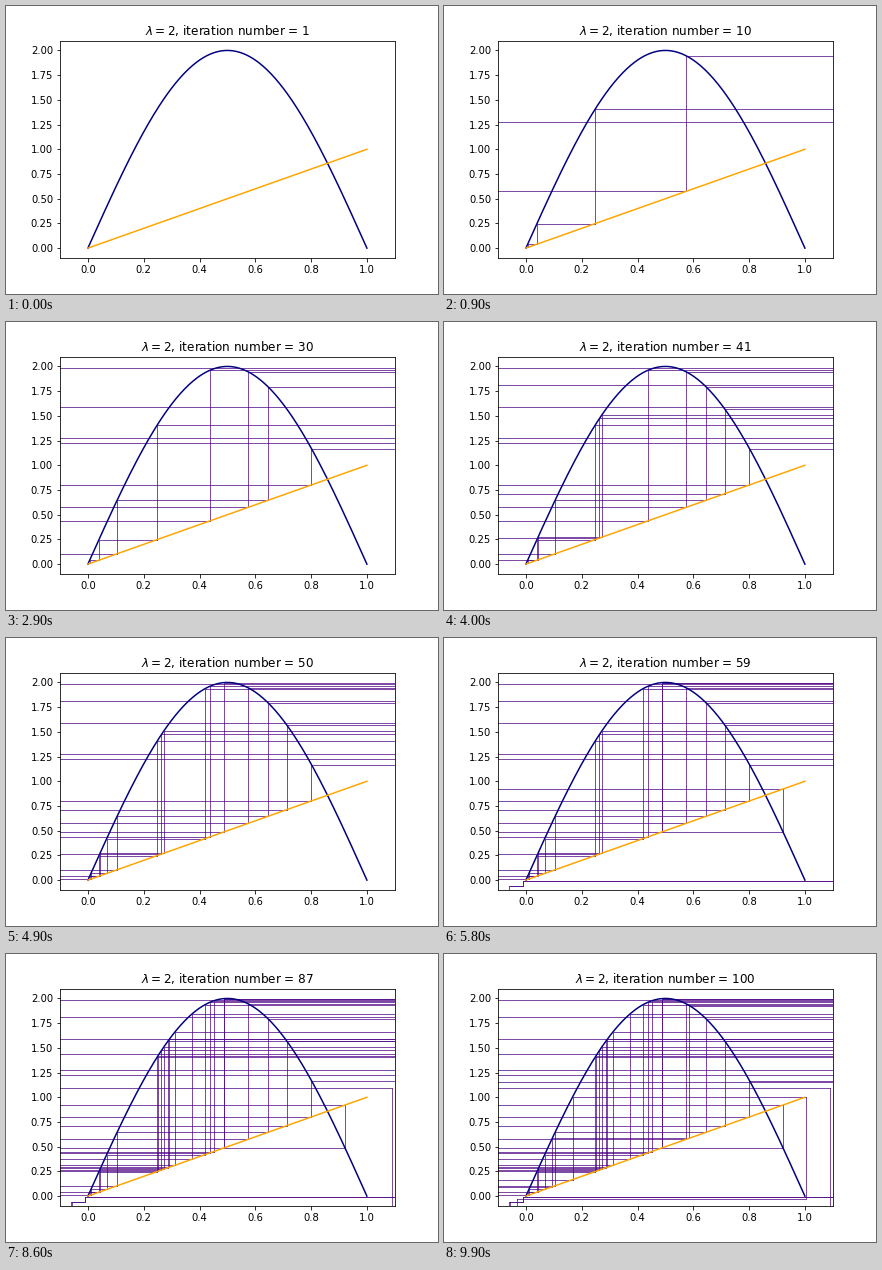
A matplotlib script for the animation above (10000 ms loop, 432x288 px).

```python
import math

import matplotlib.pyplot as plt
import numpy as np
from matplotlib.animation import FuncAnimation

LAM = 2
START = 0.001
STEPS = 100


def sine_map(x):
    return LAM * math.sin(math.pi * x)


plt.rcParams.update({"font.family": "DejaVu Sans", "font.size": 10})
fig = plt.figure(figsize=(6, 4), dpi=72, facecolor="white")
fig.subplots_adjust(left=0.125, right=0.9, bottom=0.125, top=0.88)
ax = fig.add_subplot()
ax.set_xlim(-0.1, 1.1)
ax.set_ylim(-0.1, 2.1)

# Each cobweb step goes up to the curve, then across to the diagonal.
web = []
x = START
for _ in range(STEPS):
    y = sine_map(x)
    web += ax.plot([x, x, y], [x, y, y], color="indigo", lw=0.7, visible=False)
    x = y

grid = np.linspace(0, 1, 200)
ax.plot(grid, LAM * np.sin(np.pi * grid), color="navy", lw=1.5)
ax.plot(grid, grid, color="orange", lw=1.5)
title = ax.set_title("", fontsize=12)


def update(frame):
    count = frame + 1
    for i, line in enumerate(web):
        line.set_visible(i < count)
    title.set_text(rf"$\lambda = {LAM}$, iteration number = {count}")
    return [*web, title]


anim = FuncAnimation(fig, update, frames=STEPS, interval=100,
                     repeat=True, repeat_delay=0, blit=False)
plt.show()
```
